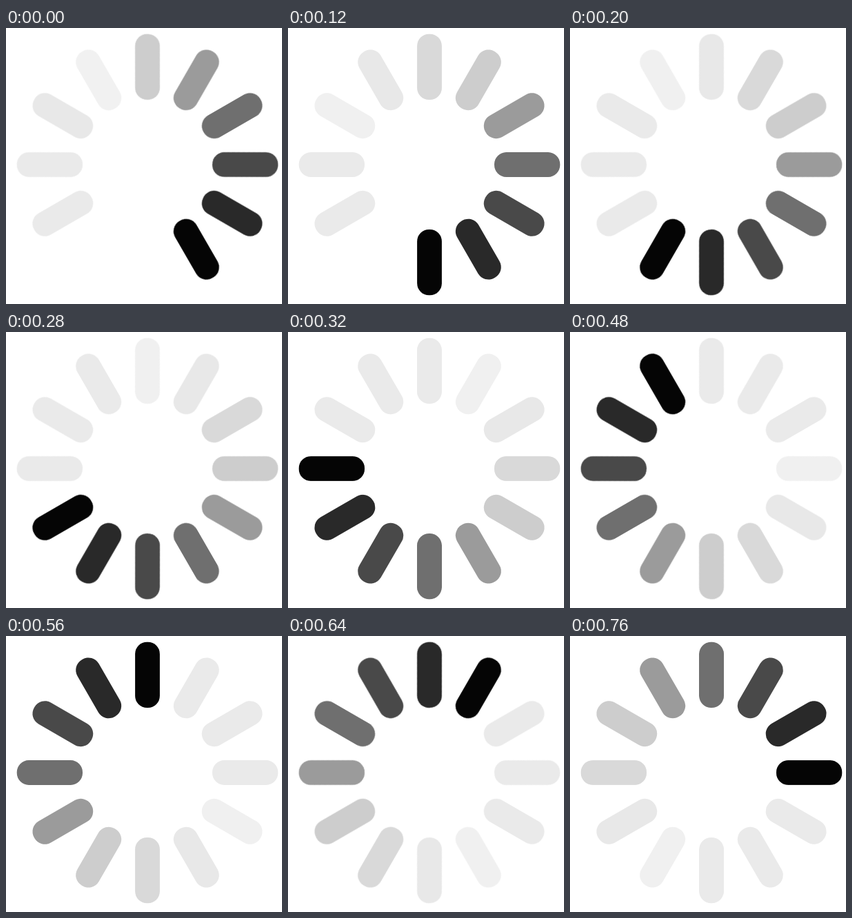
Write an HTML page that moves like this. It is 400 px wide and 400 px high and loops after 0.88 s.

```html
<!DOCTYPE html>
<html lang="en">
<head>
<meta charset="utf-8">
<title>Spinner</title>
<style>
  html, body { margin: 0; width: 100%; height: 100%; overflow: hidden; background: #fff; }
  svg { display: block; width: 100vw; height: 100vh; }

  .wheel, .fresh, .faint, .tail, .end { animation: 880ms step-end infinite; }
  .wheel { animation-name: turn; }
  .fresh { animation-name: pale; }
  .faint { animation-name: fade; }
  .tail { animation-name: join; }
  .end { animation-name: join-late; }

  /* Uneven ticks: 120, 200, 280, 320, 400, 480, 560, 640, 720 and 760 ms */
  @keyframes turn {
    0% { transform: rotate(150deg); }
    13.63% { transform: rotate(180deg); }
    22.72% { transform: rotate(210deg); }
    31.81% { transform: rotate(240deg); }
    36.36% { transform: rotate(270deg); }
    45.45% { transform: rotate(300deg); }
    54.54% { transform: rotate(330deg); }
    63.63% { transform: rotate(360deg); }
    72.72% { transform: rotate(390deg); }
    81.81% { transform: rotate(420deg); }
    86.36%, 100% { transform: rotate(450deg); }
  }
  @keyframes pale {
    0% { fill: #f1f1f1; }
    13.63%, 100% { fill: #d9d9d9; }
  }
  @keyframes fade {
    0% { fill: #eaeaea; }
    13.63%, 100% { fill: #f0f0f0; }
  }
  @keyframes join {
    0% { visibility: hidden; }
    13.63%, 100% { visibility: visible; }
  }
  @keyframes join-late {
    0% { visibility: hidden; }
    22.72%, 100% { visibility: visible; }
  }
</style>
</head>
<body>
<svg viewBox="0 0 400 400">
  <defs>
    <rect id="bar" x="-17.9" y="-189.25" width="35.8" height="95.25" rx="17.2"/>
  </defs>
  <g transform="translate(205 198)">
    <!-- Bars run counterclockwise from the black head to the faint tail -->
    <g class="wheel">
      <use href="#bar" fill="#050505"/>
      <use href="#bar" fill="#292929" transform="rotate(-30)"/>
      <use href="#bar" fill="#494949" transform="rotate(-60)"/>
      <use href="#bar" fill="#6f6f6f" transform="rotate(-90)"/>
      <use href="#bar" fill="#9b9b9b" transform="rotate(-120)"/>
      <use href="#bar" fill="#cdcdcd" transform="rotate(-150)"/>
      <use href="#bar" class="fresh" fill="#d9d9d9" transform="rotate(-180)"/>
      <use href="#bar" fill="#e8e8e8" transform="rotate(-210)"/>
      <use href="#bar" class="faint" fill="#f0f0f0" transform="rotate(-240)"/>
      <use href="#bar" fill="#eaeaea" transform="rotate(-270)"/>
      <use href="#bar" class="tail" fill="#eaeaea" transform="rotate(-300)"/>
      <use href="#bar" class="end" fill="#eaeaea" transform="rotate(-330)"/>
    </g>
  </g>
</svg>
</body>
</html>
```
